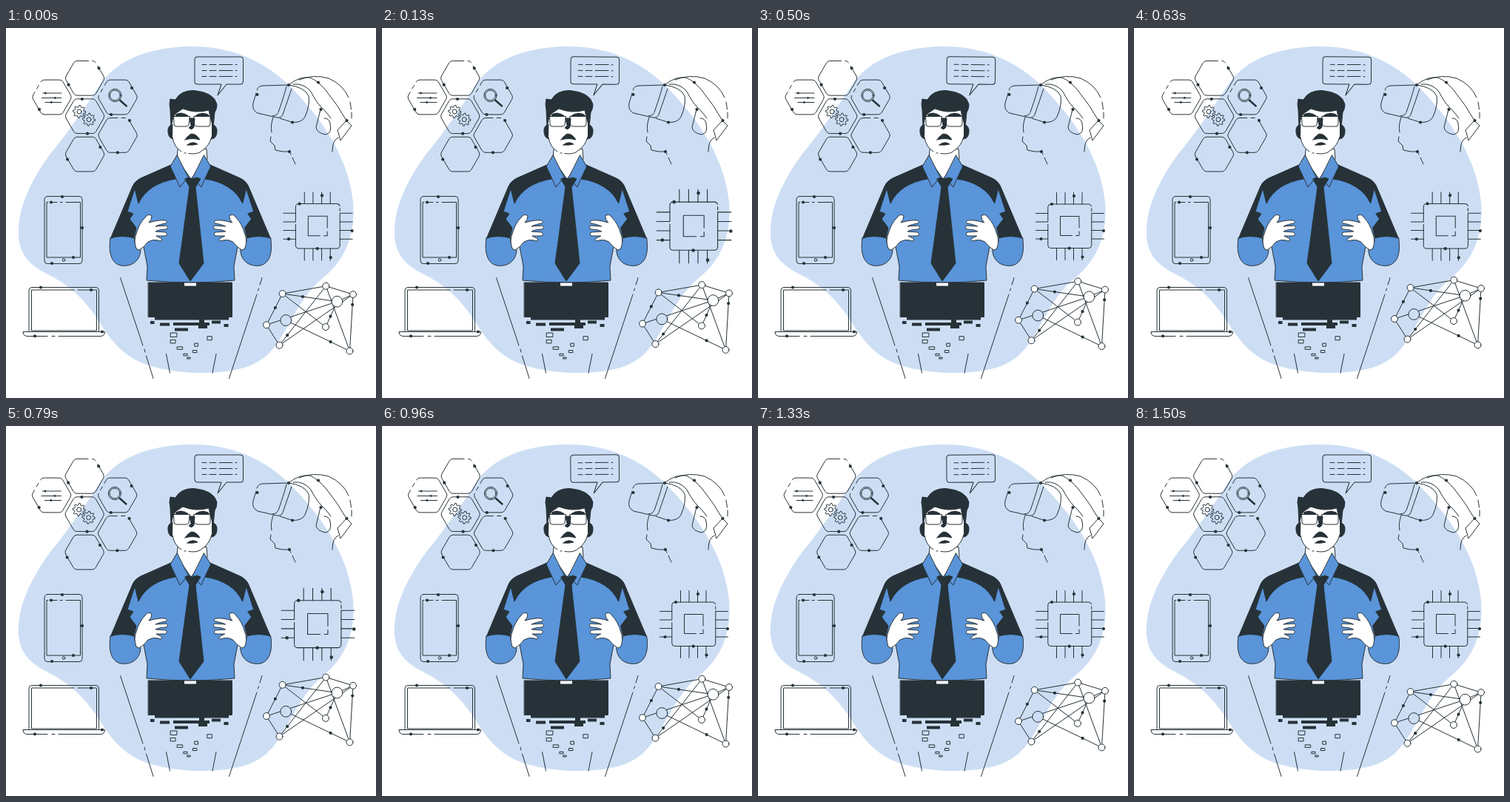
These frames come from a looping animation (500x500 px, 1540 ms). An HTML page:

```html
<!DOCTYPE html>
<html lang="en">
<head>
<meta charset="utf-8">
<title>Technology around a man</title>
<style>
  html, body { margin: 0; width: 100%; height: 100%; overflow: hidden; background: #fff; }
  svg { display: block; width: 100%; height: 100%; fill: none; stroke: #263238; stroke-linecap: round; stroke-linejoin: round; }
  .dark { fill: #263238; }
  .blue { fill: #5a94d9; }
  .white { fill: #fff; }
  .pale { fill: #cddef4; }
  .flat { stroke: none; }
  .dots { stroke-width: 4.2; }
  .bars { stroke-width: 4; stroke-linecap: butt; }
</style>
</head>
<body>
<svg viewBox="0 0 500 500">
  <defs>
    <g id="arm">
      <path class="blue flat" d="M174 217L163 248L167 262L176 284L196 256L182 230Z"/>
      <path class="dark" d="M225 184L182 203Q174 207 171 214L141 285L173 284L176 270L167 258L172 251L164 248L174 217L179 237Q192 210 229 204Z"/>
      <path class="blue" d="M141 284C138 305 143 318 155 321C170 323 181 315 182 300L176 292Q172 287 174 284Q157 279 141 284Z"/>
      <path class="white" d="M176 298Q172 288 176 278Q180 264 188 256Q192 250 197 254Q197 259 193 263Q206 259 215 260Q219 261 216 264Q208 265 202 268L217 267Q220 269 217 272Q207 272 202 275L216 276Q219 278 216 281L203 281Q210 284 211 286Q210 289 206 287Q198 285 192 289Q186 297 180 300Z"/>
      <path class="blue" d="M231 172L222 187L235 215L246 202Z"/>
    </g>
  </defs>

  <path class="pale flat" d="M248 25C300 24 345 42 380 75C415 110 462 165 469 235C473 285 455 316 428 338C402 360 391 386 372 418C358 440 345 451 325 458C285 471 220 468 182 452C150 437 138 415 120 388C100 360 82 346 55 332C27 318 15 300 17 270C19 235 38 200 60 170C86 138 105 110 125 80C140 55 165 40 195 32C215 27 232 25 248 25Z"/>

  <g id="hexes">
    <path d="M50 88H75M48.500 94.500H75M53 100.500H75"/>
    <circle cx="147.500" cy="91" r="8.600"/><circle cx="147.500" cy="91" r="6.900"/>
    <path stroke-width="2.400" d="M154 97.500L163 105.500"/>
    <path stroke-width="2.800" d="M53.500 88h0M66.500 94.500h0M61.500 100.500h0"/>
    <path class="dots" d="M125.700 54.300h0M84.700 76.700h0M170.200 81h0M103 96h0M142.300 117h0M110.200 142.700h0M167.200 125h0M127.500 161h0M151 168.300h0M83.200 177.500h0M45.200 110h0"/>
  </g>

  <g id="bubble">
    <path d="M298 76H316.500Q320.500 76 320.500 72V43Q320.500 39 316.500 39H259Q255 39 255 43V72Q255 76 259 76H291L286 91Z" stroke="none"/>
    <path d="M298 76H316.500Q320.500 76 320.500 72V43Q320.500 39 316.500 39H259Q255 39 255 43V72Q255 76 259 76H291L286 91L298 76"/>
    <path stroke-dasharray="6 4 9 4 18 4" d="M265 49.500H312M265 57.500H312M265 65.500H312"/>
  </g>

  <g id="headset">
    <path d="M382 77L347 78Q341 78 339 84M338 88L334 101Q332 111 340 115L366 121Q372 122 374 117L386 82M379 79Q376 91 369 111Q367 119 360 119"/>
    <path d="M382 77Q404 80 409 92Q411 104 404 120Q400 128 387 127.500L370 122"/>
    <path d="M382 77Q396 65 411 67Q422 72 432 84Q449 105 460 125M388 76Q402 74 412 86Q421 104 432 113L439 122"/>
    <path d="M396 70Q415 62 436 68Q456 77 463 94M465 100L466.500 110M467 114V122"/>
    <path d="M425 110L419 134Q420 142 432 144Q441 142 438 129Q437 122 430 122M460 125L467 132L452 152L448 138L460 125M449 148Q441 151 441 167"/>
    <path d="M361 121Q357 132 359 141M358 147L357 153L363 159L364 165Q374 168 383 167L385 171M387 175L391 184"/>
    <path class="dots" d="M339.500 90h0M382 77h0M387 127.500h0M422 73.500h0M425.500 110h0M460.500 125h0M383 167h0"/>
  </g>

  <g id="tablet">
    <rect x="52" y="227.500" width="51" height="91" rx="4"/>
    <path d="M61 235.500H69M73 235.500H76M81 235.500H100.500V310H55V235.500H57"/>
    <circle cx="78" cy="313.500" r="1.800"/>
    <path class="dots" d="M76 228h0M61 235.500h0M103 270h0M91 310h0M62 318h0"/>
  </g>

  <g id="laptop">
    <path d="M31 410V354.500Q31 350.500 35 350.500H121Q125.500 350.500 125.500 355V410M92 354H34.500V409H122.500V354H97"/>
    <path d="M56 416.500H29Q23 416.500 23 410.500H133.500Q133.500 416.500 127 416.500H71M62 416.500H66"/>
    <path class="dots" d="M47 350.500h0M115 354h0M130 410.500h0M39 416.300h0"/>
  </g>

  <g id="chip">
    <rect x="391.800" y="238" width="59" height="59.500" rx="4" stroke-dasharray="56 3 4 3 134 4 40"/>
    <rect x="408.500" y="254.500" width="25.500" height="26" stroke-dasharray="41 5 10 5"/>
    <path class="dots" d="M397 238h0M427 227h0M467 274h0M382.500 285h0M420.700 297.700h0M438.500 309.500h0"/>
  </g>

  <g id="network"></g>

  <path d="M154.500 337.500L185 429M187 434L188 438M189.500 443L199 473.500M346 337.500L343 347M341.500 352L340.500 355M339 360L301.500 473.500M216.500 440.500L221.500 466M284 440.500L279 466"/>

  <g id="man">
    <path class="blue" d="M223 186L178 207L174 217L178 255L185 290L191 322L190 341Q250 347 309 341L308 322L314 290L321 255L325 217L321 207L276 186Z"/>
    <path class="white" d="M232 164L231 177L250 204L272 177L271 164Z"/>
    <path class="dark" d="M226 130Q218 131 219 141Q220 150 227 150ZM277 130Q286 131 285 141Q284 150 277 150Z"/>
    <path class="white flat" d="M226 110L225 148Q227 161 239 168Q250 172 262 168Q275 160 278 147V108H230Z"/>
    <path d="M225 148Q227 161 237 167M241 169H243M247 169.500Q256 171 262 168Q275 160 278 147"/>
    <path class="dark" d="M223 133L222 111Q220 102 222 96L229 97Q236 84 254 84.500Q281 87 285 103Q285 110 282 114L280 134L276 120L274 111Q256 116 239 109L230 115L226 120Z"/>
    <path class="dark flat" d="M230 116Q238 112 246 118L247 121H228ZM256 118Q265 112 274 117L275 121H255Z"/>
    <path class="white" d="M227 119.500H248.500L247 131Q246 133 243 133H230Q227 133 227 130ZM254 119.500H276V130Q276 133 273 133H259Q256 133 255 131Z"/>
    <path class="dark" d="M248 122H255L254 134L251 137L247 135L250 132Z"/>
    <path class="dark" d="M242 151Q247 144 251 143Q257 143 262 151Q252 148 242 151ZM245 158Q252 152 259 157Q252 159 245 158Z"/>
    <use href="#arm"/>
    <use href="#arm" transform="translate(498.700) scale(-1 1)"/>
    <path class="dark" d="M242 204L246 202L252 204L258 202L263 204L256 215L267 318L249 342L234 318L248 215Z"/>
    <path class="dark" d="M192.500 344H305.500V390.500H192.500Z"/>
    <path class="white flat" d="M241 344.500H257V348.500H241Z"/>
    <path class="bars" d="M201 392.500H301M195 398H200.500M208 400.500H221M226 400H275M261 396H268M278 397.500H290M294.500 402H300.500M228 407.500H246M260 404H272"/>
  </g>
</svg>
<script>
const LOOP = 1540, STEPS = 37, FIRST_PHASE = 0.0135;
const byId = id => document.getElementById(id);

function add(parent, tag, attrs) {
  const el = document.createElementNS('http://www.w3.org/2000/svg', tag);
  for (const name in attrs) el.setAttribute(name, attrs[name]);
  return byId(parent).appendChild(el);
}
const addPath = (parent, d, attrs) => add(parent, 'path', { d, ...attrs });
const range = n => [...Array(n).keys()];
const polar = (cx, cy, r, degrees) => {
  const a = degrees * Math.PI / 180;
  return [cx + r * Math.cos(a), cy + r * Math.sin(a)];
};

// Flat-topped hexagon with rounded corners.
function addHex(cx, cy, dash) {
  const corner = i => polar(cx, cy, 27, 180 + 60 * i);
  const near = (i, j) => corner(i).map((v, axis) => v + (corner(j)[axis] - v) * .12);
  const d = range(6).map(i => `${near(i, i - 1)}Q${corner(i)} ${near(i, i + 1)}`);
  addPath('hexes', `M${d.join('L')}Z`, { pathLength: 60, 'stroke-dasharray': dash });
}

function addGear(cx, cy) {
  const points = range(32).map(i => polar(cx, cy, i % 4 < 2 ? 8.6 : 6.2, 11.25 * i));
  addPath('hexes', `M${points.join('L')}Z`);
  add('hexes', 'circle', { cx, cy, r: 3 });
}

// One cell in the middle, five around it.
addHex(106.7, 119.2, '60');
range(5).forEach(i => {
  const gapStart = 4 + 14 * i;
  addHex(...polar(106.7, 119.2, 51.4, 60 * i - 150), i < 4 ? `${gapStart % 30} 2 2 2 60` : '60');
});
addGear(99.2, 113);
addGear(112.2, 123.7);

// Four pins on each side of the chip.
range(4).forEach(i => {
  const x = 403.5 + 11.5 * i, y = 250.5 + 11.5 * i;
  addPath('chip', `M${x} 222.5V238M${x} 297.5V313.5M375.5 ${y}H391.8M450.8 ${y}H467.5`);
});

const nodes = {
  A: [432.3, 349], B: [469, 360.3], C: [373.6, 359.3], D: [447.5, 370], E: [378.3, 395.3],
  F: [352, 401.5], G: [432, 404.3], H: [369.5, 429], I: [464.5, 436.8]
};
const link = ([a, b]) => `M${nodes[a]}L${nodes[b]}`;
addPath('network', 'AB AC AH AI CD CG CF BD BI BH DG DF EI FH'.split(' ').map(link).join(''));
for (const [name, [cx, cy]] of Object.entries(nodes))
  add('network', 'circle', { cx, cy, r: 'DE'.includes(name) ? 7.4 : 4.5, class: name === 'E' ? 'pale' : 'white' });
// Beads sit part of the way along some links.
const bead = (a, b, k) => `M${nodes[a].map((v, axis) => v + (nodes[b][axis] - v) * k)}h0`;
addPath('network', bead('C', 'D', .37) + bead('C', 'F', .45) + bead('B', 'I', .18) +
  bead('D', 'G', .58) + bead('H', 'A', .17) + bead('E', 'I', .7), { class: 'dots' });

// Loose fragments scatter in a narrowing column below the body.
range(8).forEach(i => {
  const random = k => Math.abs(Math.sin(i * 12.9 + k * 78.2) * 43758.5) % 1;
  const fall = i / 7, spread = 38 * (1 - fall);
  add('man', 'rect', {
    x: 245 + spread * (i % 2 ? 1 : -1) * (.4 + .6 * random(1)), y: 412 + 33 * fall,
    width: 4 + (1 - fall) * 8 * random(2), height: 2 + 3.5 * (1 - fall)
  });
});

// Close to the standard CSS "ease" curve.
const ease = x => 1 - (1 - x ** 1.4) ** 3.2;
// Rises from 0 at start to 1 at peak, then falls to 0 at end.
const tent = (p, start, peak, end) =>
  Math.max(0, Math.min((p - start) / (peak - start), (end - p) / (end - peak)));

const float = p => -10 * tent(p, 0, .5, 1);
const wind = p => tent(p, 0, .25, .5) - tent(p, .5, .75, 1);
const heartbeat = p => 1 + .1 * (tent(p, 0, .1, .3) + tent(p, .4, .5, .6));

// Ten alternating swings that double up to 4 px and halve again.
function shake(p) {
  const swing = k => {
    const fromEnd = Math.min(k, 10 - k, 3);
    return fromEnd && (-1) ** k * 2 ** (fromEnd - 1);
  };
  const k = Math.floor(p * 10);
  return swing(k) + (swing(k + 1) - swing(k)) * ease(p * 10 - k);
}

const move = (id, transform) => byId(id).setAttribute('transform', transform);

function draw() {
  const time = (performance.now() + 3) % LOOP;
  const phase = Math.floor(time / LOOP * STEPS) / STEPS + FIRST_PHASE;
  move('hexes', `translate(${shake(phase)} 0)`);
  move('bubble', `rotate(${wind(phase)} 287.7 65)`);
  move('chip', `translate(421.3 268) scale(${heartbeat(phase)}) translate(-421.3 -268)`);
  move('network', `translate(0 ${float(phase)})`);
  requestAnimationFrame(draw);
}
draw();
</script>
</body>
</html>
```
